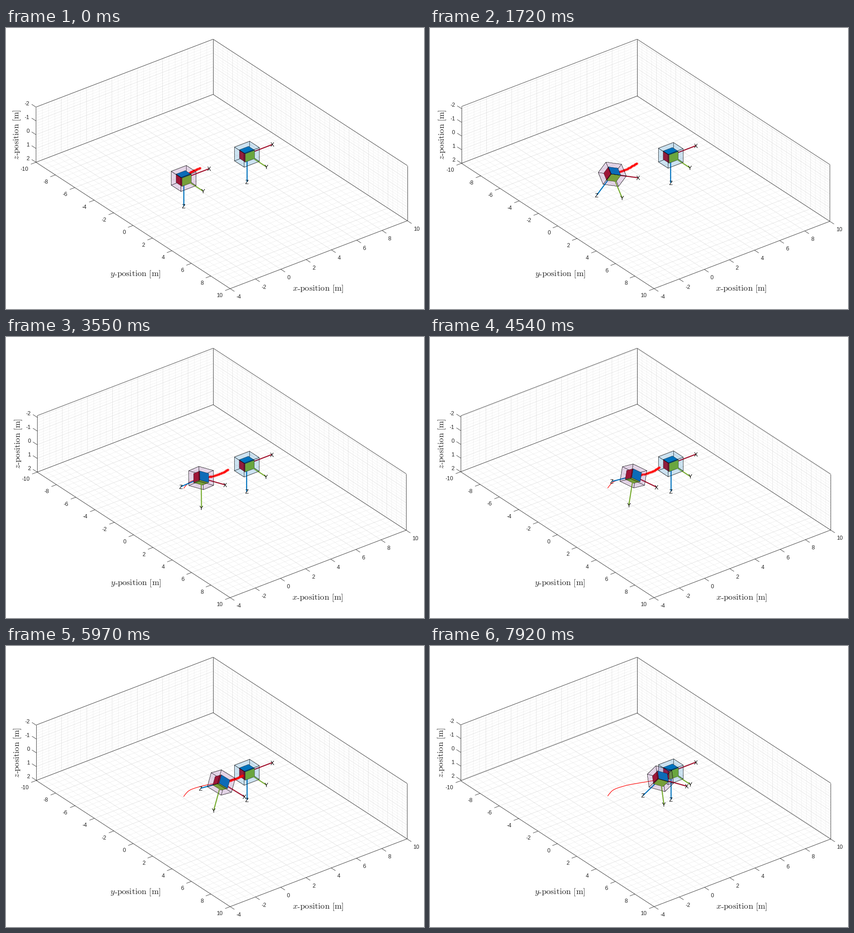
Recreate the animation shown at these times as a matplotlib script. Size 912 px wide and 614 px high, loop 8000 ms.

```python
import itertools

import matplotlib.pyplot as plt
import numpy as np
from matplotlib.animation import FuncAnimation
from matplotlib.collections import LineCollection

W, H, DPI = 912, 614, 64
PX = 72 / DPI  # points per pixel
FRAMES, INTERVAL = 80, 100
PAUSES = {2, 5, 9, 12, 20, 24, 30, 36, 44, 49, 57, 63, 71, 77}

plt.rcParams["mathtext.fontset"] = "cm"
plt.rcParams["font.family"] = "Liberation Sans"
plt.rcParams["lines.scale_dashes"] = False

# Orthographic camera: azimuth 37.5 deg, elevation 30 deg, z pointing down
AZ, EL = np.radians([37.5, 30])
RIGHT = np.array([np.cos(AZ), np.sin(AZ), 0])
DOWN = np.array([-np.sin(AZ) * np.sin(EL), np.cos(AZ) * np.sin(EL), np.cos(EL)])
TOWARD = np.array([-np.sin(AZ) * np.cos(EL), np.cos(AZ) * np.cos(EL), -np.sin(EL)])
VIEW = np.array([RIGHT, DOWN])
CENTER, HEIGHT = np.array([470.5, 297.0]), 545
X0, X1, Y0, Y1 = -4, 10, -10, 10

INK = "#262626"
RED, GREEN, BLUE = (0.635, 0.078, 0.184), (0.466, 0.674, 0.188), (0, 0.447, 0.741)
PURPLE = (0.494, 0.184, 0.556)
AXIS_COLORS = (RED, GREEN, BLUE)
OUTER = np.array([0.6, 0.5, 0.5])
INNER = 0.61 * OUTER
TARGET = np.array([5.0, 0, 0])

# Chaser motion: x, y, rotation vector, z limits, bend and end of the plan in pixels
TIMES = np.array([0, 1.0, 1.7, 3.5, 5.3, 6.6, 7.9])
KEYS = np.array([
    [0, 0, 0, 0, 0, -2, 2, 398, 315, 423, 306],
    [0.237, -0.151, 0.237, -0.206, 0.035, -2.08, 2, 420, 314, 437, 297],
    [0.608, -0.348, 0.414, -0.352, 0.235, -2.15, 2, 432, 310, 450.5, 295.5],
    [1.643, -0.356, 0.840, -0.422, 0.355, -2.12, 2, 467, 304, 483.5, 289.5],
    [2.628, -0.068, 0.915, -0.555, 0.559, -2.04, 2, 490, 296, 511, 282.5],
    [3.300, 0.162, 0.815, -0.472, 0.612, -2, 2.03, 503, 291, 519, 285],
    [3.946, 0.293, 0.552, -0.392, 0.396, -2, 2.07, 511, 287, 517, 285],
])
SLOPES = np.gradient(KEYS, TIMES, axis=0)
SLOPES[0] = 0

fig = plt.figure(figsize=(W / DPI, H / DPI), dpi=DPI, facecolor="white")
ax = fig.add_axes([0, 0, 1, 1])
ax.set_xlim(0, W)
ax.set_ylim(H, 0)
ax.axis("off")


def motion(t):
    """Smooth cubic path through the keys at one time or an array of times."""
    t = np.asarray(t, float)
    k = np.clip(np.searchsorted(TIMES, t, side="right") - 1, 0, len(TIMES) - 2)
    span = (TIMES[k + 1] - TIMES[k])[..., None]
    u = (t - TIMES[k])[..., None] / span
    return ((1 + 2 * u) * (1 - u) ** 2 * KEYS[k] + u * (1 - u) ** 2 * span * SLOPES[k]
            + u * u * (3 - 2 * u) * KEYS[k + 1] + u * u * (u - 1) * span * SLOPES[k + 1])


def rotation(vec):
    angle = np.linalg.norm(vec)
    if angle < 1e-9:
        return np.eye(3)
    x, y, z = vec / angle
    k = np.array([[0, -z, y], [z, 0, -x], [-y, x, 0]])
    return np.eye(3) + np.sin(angle) * k + (1 - np.cos(angle)) * k @ k


class Scene:
    """One picture, painted back to front."""

    def __init__(self, zmin, zmax):
        self.z0, self.z1 = zmin, zmax
        self.mid = np.array([(X0 + X1) / 2, (Y0 + Y1) / 2, (zmin + zmax) / 2])
        size = np.array([X1 - X0, Y1 - Y0, zmax - zmin])
        self.scale = HEIGHT / (np.abs(DOWN) @ size)
        self.order = itertools.count(1)

    def project(self, points):
        return CENTER + self.scale * (np.asarray(points, float) - self.mid) @ VIEW.T

    def lines(self, segments, color, width, style="solid"):
        ax.add_collection(LineCollection([self.project(s) for s in segments], colors=color,
                                         linewidths=width * PX, linestyles=style,
                                         zorder=next(self.order)), autolim=False)

    def path(self, pts, color, width, **kw):
        ax.plot(pts[:, 0], pts[:, 1], color=color, lw=width * PX, zorder=next(self.order),
                scalex=False, scaley=False, **kw)

    def text(self, x, y, s, ha="center", size=12, color=INK, **kw):
        ax.text(x, y, s, ha=ha, va="baseline", fontsize=size * PX, color=color,
                zorder=next(self.order), **kw)

    def face(self, center, rot, half, axis, sign, fill, alpha):
        corners = []
        for a, b in ((-1, -1), (-1, 1), (1, 1), (1, -1)):
            p = np.zeros(3)
            p[axis], p[axis - 2], p[axis - 1] = sign, a, b
            corners.append(center + rot @ (p * half))
        xy = self.project(corners)
        # neighbouring faces share their edges, so each draws a thin one
        ax.fill(xy[:, 0], xy[:, 1], facecolor=(*fill, alpha), edgecolor="black",
                lw=0.45 * PX, joinstyle="round", zorder=next(self.order))

    def arrow(self, center, rot, axis, start):
        tip = rot[:, axis]
        self.path(self.project([center + start * tip, center + 2 * tip]),
                  AXIS_COLORS[axis], 2.3, solid_capstyle="butt")

    def body(self, center, rot, tint, plan=None):
        """Coloured core with its axes in a clear hull."""
        depth = TOWARD @ rot
        front = [(k, 1 if depth[k] > 0 else -1) for k in range(3)]
        for k, sign in front:
            self.face(center, rot, OUTER, k, -sign, tint, 0.1)
        for k in range(3):
            if depth[k] <= 0:
                self.arrow(center, rot, k, 0)
        if plan is not None:
            self.path(plan, "red", 0, marker=(8, 2, 0), markersize=6 * PX,
                      markeredgewidth=0.5 * PX, linestyle="none")
        for k, sign in front:
            self.face(center, rot, INNER, k, sign, AXIS_COLORS[k], 1)
        for k in range(3):
            if depth[k] > 0:
                self.arrow(center, rot, k, INNER[k])
        for k, sign in front:
            self.face(center, rot, OUTER, k, sign, tint, 0.1)
        for k, name in enumerate("XYZ"):
            x, y = self.project(center + 2 * rot[:, k])
            self.text(x - 0.3, y + 4.8, name, size=12.5, color="black")

    def grid(self, xs, ys, zs, color, width, style="solid"):
        z0, z1 = self.z0, self.z1
        segs = [[(x, Y1, z1), (x, Y0, z1), (x, Y0, z0)] for x in xs]
        segs += [[(X0, y, z1), (X1, y, z1), (X1, y, z0)] for y in ys]
        segs += [[(X0, Y0, z), (X1, Y0, z), (X1, Y1, z)] for z in zs]
        self.lines(segs, color, width, style)

    def axis_title(self, letter, advance, x, y, upright=False, em=18.45):
        gap = r"\hspace{0.38}"
        s = rf"${letter}{gap}\mathrm{{position}}{gap}\mathrm{{[m]}}$"
        self.text(x, y, s, ha="left", size=em,
                  rotation=90 if upright else 0, rotation_mode="anchor")
        along = (advance + np.array([0.02, 0.28])) * em
        rise = np.full(2, 0.215 * em)
        pts = (x - rise, y - along) if upright else (x + along, y - rise)
        self.path(np.column_stack(pts), INK, 1.1, solid_capstyle="butt")

    def axes(self):
        z0, z1 = self.z0, self.z1
        minor = [[v for v in np.arange(lo, hi, 0.5) if v % 2]
                 for lo, hi in ((X0, X1), (Y0, Y1))]
        fine = [k / 5 for k in range(-10, 11) if k % 5]
        self.grid(*minor, fine, "#c9c9c9", 0.7, (0, (1 * PX, 2 * PX)))
        self.grid(range(X0, X1 + 1, 2), range(Y0, Y1 + 1, 2), range(-2, 3), "#dfdfdf", 0.8)

        frame = [[(X0, Y0, z) for z in (z0, z1)], [(X1, Y1, z) for z in (z0, z1)],
                 [(X1, Y0, z) for z in (z0, z1)],
                 [(X0, Y0, z0), (X1, Y0, z0), (X1, Y1, z0)],
                 [(X0, Y0, z1), (X1, Y0, z1), (X1, Y1, z1), (X0, Y1, z1), (X0, Y0, z1)]]
        self.lines(frame, INK, 0.8)

        tick, drop = 0.44, 4.3  # drop: from a digit's middle to its baseline
        for x in range(X0, X1 + 1, 2):
            px, py = self.project((x, Y1, z1))
            self.lines([[(x, Y1, z1), (x, Y1 + tick, z1)]], INK, 0.8)
            self.text(px + 13.5, py + 17.3 + drop, str(x), ha="left")
        for y in range(Y0, Y1 + 1, 2):
            px, py = self.project((X0, y, z1))
            self.lines([[(X0, y, z1), (X0 - tick * 0.9, y, z1)]], INK, 0.8)
            self.text(px - 16, py + 14.5 + drop, str(y), ha="right")
        for z in range(-2, 3):
            px, py = self.project((X0, Y0, z))
            self.lines([[(X0, Y0, z), (X0, Y0 - tick, z)]], INK, 0.8)
            self.text(px - 14, py - 8.3 + drop, str(z), ha="right")

        mid_x = self.project((self.mid[0], Y1, z1))[0]
        mid_y = self.project((X0, self.mid[1], z1))[0]
        left, mid_z = self.project((X0, Y0, self.mid[2]))
        self.axis_title("x", 0.572, mid_x - 57.3, 574.5)
        self.axis_title("y", 0.51, mid_y - 50.3, 542.5)
        self.axis_title("z", 0.49, left - 37.3, mid_z + 54.5, upright=True)


def update(i):
    for artist in [*ax.lines, *ax.collections, *ax.patches, *ax.texts]:
        artist.remove()
    if i in PAUSES:
        i -= 1
    t = i * INTERVAL / 1000
    state = motion(t)
    scene = Scene(*state[5:7])
    scene.axes()
    scene.body(TARGET, np.eye(3), BLUE)

    past = motion(np.linspace(0, t, i + 2))
    trail = np.column_stack([past[:, :2], np.zeros(i + 2)])
    scene.path(scene.project(trail), "red", 1.2)

    chaser = np.array([state[0], state[1], 0])
    u = np.linspace(0, 1, 21)[:, None]
    plan = ((1 - u) ** 2 * scene.project(chaser) + 2 * u * (1 - u) * state[7:9]
            + u * u * state[9:11])
    scene.body(chaser, rotation(state[2:5]), PURPLE, plan)
    return []


anim = FuncAnimation(fig, update, frames=FRAMES, interval=INTERVAL, repeat=True,
                     repeat_delay=0, cache_frame_data=False)
plt.show()
```
